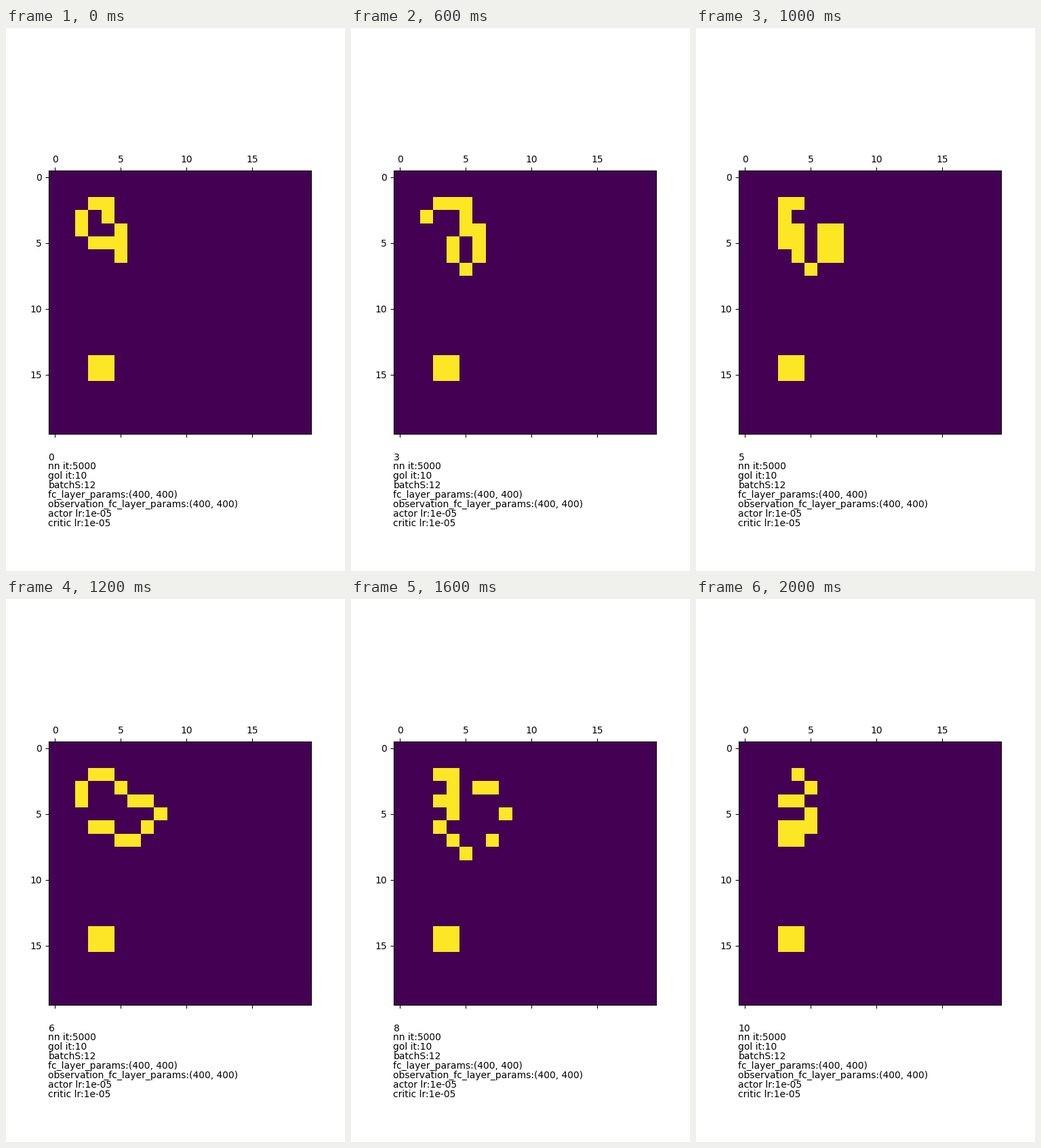
A matplotlib script for the animation above (8000 ms loop, 500 by 800 pixels).

```python
import matplotlib.pyplot as plt
import numpy as np
from matplotlib.animation import FuncAnimation

SIZE = 20
MARGIN = 2            # cells this close to the border never come alive
STEPS = 10
INTERVAL = 200
FRAMES = 40           # the last generation is held until the loop ends
WIDTH, HEIGHT, DPI = 500, 800, 100

START = {2: (3, 4), 3: (2, 4), 4: (2, 5), 5: (3, 4, 5), 6: (5,),
         14: (3, 4), 15: (3, 4)}
SETTINGS = (
    "nn it:5000",
    "gol it:10",
    "batchS:12",
    "fc_layer_params:(400, 400)",
    "observation_fc_layer_params:(400, 400)",
    "actor lr:1e-05",
    "critic lr:1e-05",
)


def first_generation():
    grid = np.zeros((SIZE, SIZE), dtype=int)
    for row, columns in START.items():
        grid[row, list(columns)] = 1
    return grid


def next_generation(grid):
    """Conway's rules, applied inside the dead margin only."""
    neighbours = sum(
        np.roll(grid, (dy, dx), axis=(0, 1))
        for dy in (-1, 0, 1) for dx in (-1, 0, 1) if dy or dx
    )
    alive = (neighbours == 3) | ((grid == 1) & (neighbours == 2))
    inner = (slice(MARGIN, -MARGIN),) * 2
    result = np.zeros_like(grid)
    result[inner] = alive[inner]
    return result


generations = [first_generation()]
for _ in range(STEPS):
    generations.append(next_generation(generations[-1]))

fig, ax = plt.subplots(figsize=(WIDTH / DPI, HEIGHT / DPI), dpi=DPI)
board = ax.matshow(generations[0], cmap="viridis", vmin=0, vmax=1)


def text_line(baseline, text=""):
    return fig.text(0.125, 1 - baseline / HEIGHT, text, fontsize=10)


counter = text_line(637)
for i, setting in enumerate(SETTINGS):
    text_line(650 + 14 * i, setting)


def update(frame):
    step = min(frame, STEPS)
    board.set_data(generations[step])
    counter.set_text(str(step))
    return board, counter


animation = FuncAnimation(fig, update, frames=FRAMES, interval=INTERVAL,
                          repeat=True, repeat_delay=0)
plt.show()
```
